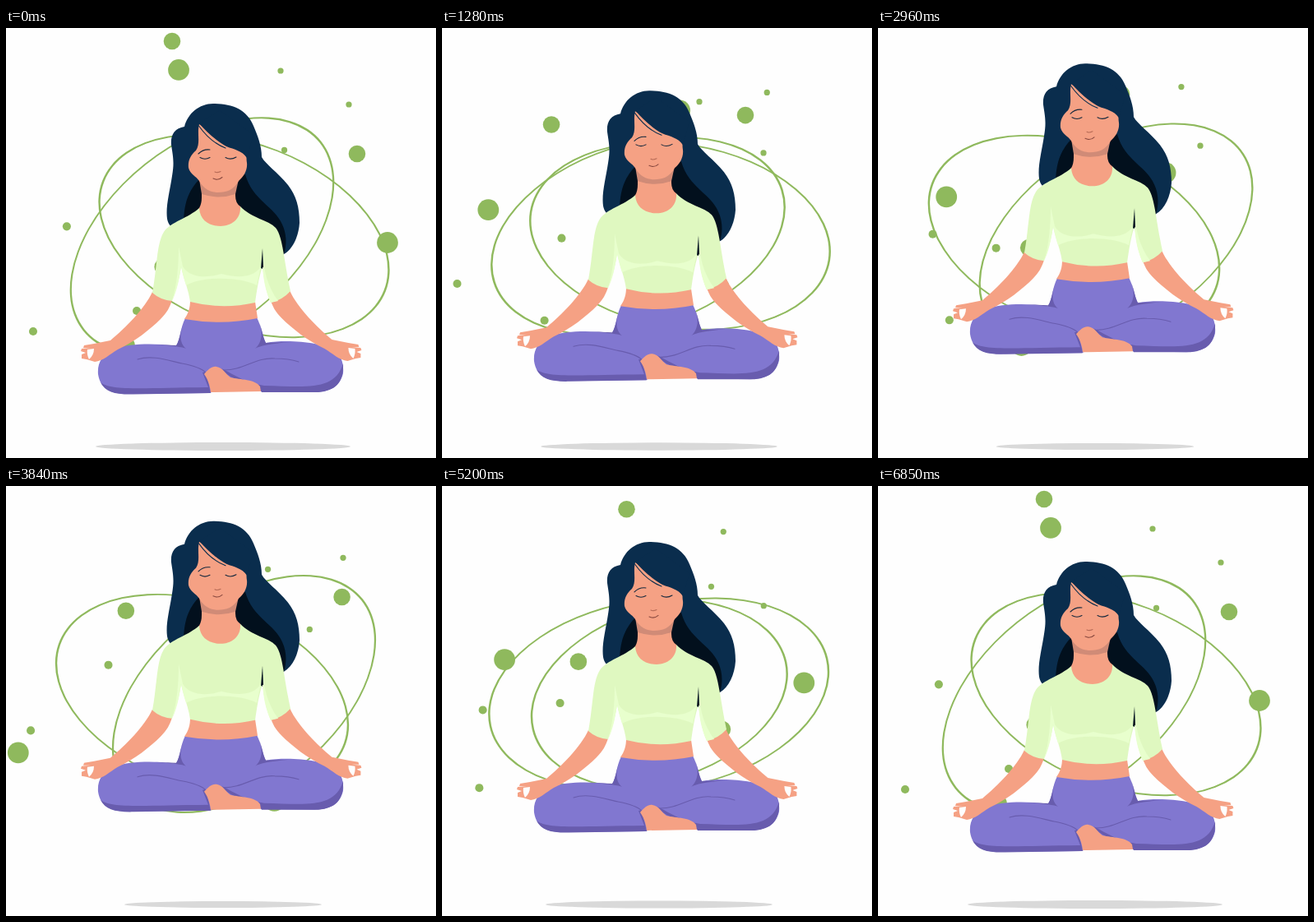
Recreate the animation shown at these times as an HTML page. Size 523 px wide and 523 px high, loop 6890 ms.

```html
<!DOCTYPE html>
<html lang="en">
<head>
<meta charset="utf-8">
<title>Meditation</title>
<style>
  html, body { margin: 0; width: 100%; height: 100%; overflow: hidden; background: #fefefe; }
  svg { display: block; width: 100vw; height: 100vh; }
  .green { fill: #8fb95d; }
  .hair { fill: #0a2d4d; }
  .dark { fill: #02101d; }
  .skin { fill: #f5a184; }
  .shirt { fill: #dff8c0; }
  .light { fill: #e8ffcd; }
  .pants { fill: #8177d0; }
  .shade { fill: #685cae; }
  .line { fill: none; stroke-width: 1.1; stroke-linecap: round; }
</style>
</head>
<body>
<svg viewBox="0 0 523 523">
  <defs>
    <path id="ring" class="green" fill-rule="evenodd"
      d="M-185 0a185 112.200 0 1 0 370 0a185 112.200 0 1 0-370 0M-182.500 0a182.500 110.400 0 1 0 365 0a182.500 110.400 0 1 0-365 0"/>
    <g id="arm">
      <path class="skin" d="M178 321C169 341 145 365 127 380L107 384L95 386L94 389L103 389L92 390L91 393L97 395L92 397L92 402L98 403L108 406C118 405 126 397 136 391C156 382 176 366 188 354C196 346 199 340 202 331Z"/>
      <path fill="#fefefe" d="M99 391L107 390Q107 398 101 403Q98 397 99 391Z"/>
    </g>
  </defs>

  <ellipse id="shadow" cx="264" cy="509" fill="#d9d9d9"/>
  <use id="ringA" href="#ring"/>
  <use id="ringB" href="#ring"/>
  <g id="dots" class="green"></g>

  <g id="woman">
    <path class="hair" d="M252 92C235 92 221 104 217 120C205 122 200 130 201 142C203 156 205 163 202 180C199 200 194 217 196 232C197 238 200 241 204 245L250 260L311 293C320 285 330 278 338 275C349 269 356 253 357 237C357 218 353 204 343 191C330 175 316 166 311 157C311 143 306 131 301 119C293 99 275 92 252 92Z"/>
    <path class="dark" d="M236 183C224 196 217 208 216 236L240 240L311 293L338 275C342 262 341 250 336 239C327 217 300 210 291 178Z"/>

    <path class="skin" d="M238 185V206Q238 214 235 219C226 250 295 250 285 217Q279 213 279 204V185Z"/>
    <path fill="#d08b77" d="M235 184L238 202Q259 209 279 202L283 184Z"/>
    <path class="skin" d="M235 117C232 128 237 140 231 149C225 154 221 161 222 170C224 178 231 180 235 186C241 197 250 200 258 200C268 200 277 197 283 186C289 181 294 173 293 164C292 158 293 154 292 150C272 140 250 128 235 117Z"/>
    <path class="hair" d="M235 116C244 127 257 138 268 144C278 148 287 149 293 158L301 130L260 100Z"/>
    <path class="line" stroke="#0a2d4d" d="M234.500 119C243 131 254 141 267 146"/>
    <path class="line" stroke="#14283d" d="M234 153Q240 147 248 148M236 157.500Q242 161 248 157.500M267 157.500Q273 161 280 157"/>
    <path class="line" stroke="#b96d58" d="M254 175Q257 176.500 261 174.500"/>
    <path class="line" stroke="#8a4a40" d="M252 183Q258 186 263 181.500"/>

    <path class="pants" d="M218 353Q262 361 305 352C311 364 312 375 316 383C345 378 385 383 400 392C408 399 411 408 410 420C406 436 395 442 375 443L311 442L270 434L248 444L155 445C130 446 115 441 112 421C111 407 117 396 133 390C150 384 180 383 207 387C212 378 212 365 218 353Z"/>
    <path class="shade" d="M115 431C127 441 160 438 246 437L239 419L243 418L249 444L155 445.500C133 446 121 443 115 431ZM262 414C280 423 292 432 314 435C365 436 400 442 410 408C411 430 402 441 380 443L311 443L305 434C290 428 274 430 262 414Z"/>
    <path class="shade" d="M215 362C210 376 213 385 219 390Q213 387 180 385L207 386C212 378 212 368 215 362ZM308 359C314 374 309 385 303 390Q310 385 345 382L316 383C312 376 312 367 308 359Z"/>
    <path class="line" stroke="#685cae" d="M160 403C178 397 199 405 214 408C230 411 239 415 243 419M264 416C288 417 304 400 327 402C340 402 350 404 356 406"/>
    <path class="skin" d="M241 421C246 415 251 411 256 412C264 413 267 421 273 425C285 428 303 427 309 436L310 442L249 443C248 433 244 425 241 421Z"/>

    <path class="skin" d="M224 331Q263 341 303 333L306 353Q262 362 217 354C222 347 224 340 224 331Z"/>
    <use href="#arm"/>
    <use href="#arm" transform="matrix(-1 0 0 1 523.400 -1)"/>
    <path class="shirt" d="M235 219C236 234 247 241 261 241C275 241 286 232 285 217C298 231 320 234 328 243C337 254 338 284 346 320Q336 331 322 334C316 320 314 306 312 290C307 305 305 320 303 334Q263 343 224 333C222 318 216 305 213 290C210 310 206 320 202 332Q188 331 178 322C184 290 183 262 192 248C200 236 222 231 235 219Z"/>
    <path class="light" d="M210 266C210 290 208 312 202 332C207 322 210 310 213 290C215 300 217 307 219 313C238 302 285 302 305 313L310 290C300 306 278 303 262 299C246 304 224 305 215 290ZM312 270C313 295 318 314 331 332L322 334C315 318 313 305 312 290Z"/>
    <path class="dark" d="M312 268L310 292.500L313 291Z"/>
  </g>
</svg>

<script>
const LOOP = 6890, LAST = 6850, STEP = 80;
const $ = id => document.getElementById(id);

// Closed track of the dots: [share of the loop, x, y]
const track = [
  [0, 0, 0], [.11, 34.2, 19.3], [.187, 61.3, 26.4], [.268, 83, 41], [.28, 85.4, 47.1],
  [.357, 75.3, 70.2], [.432, 58, 91.2], [.455, 57, 100], [.521, 49, 121.3], [.548, 38.8, 124.5],
  [.678, 5, 97], [.7, 1.2, 88.6], [.841, -17.1, 45.5], [.867, -21, 37.6], [.945, -16, 10.5], [.96, -11.5, 6]
];
const starts = [0, .268, .68];

// Each swarm runs on the same track: origin, complex factor, mirrored or not
const swarms = [
  { x: 334, y: 52, re: 1, im: 0, flip: 1 },
  { x: 33, y: 369, re: 1.34, im: .361, flip: -1 },
  { x: 202, y: 16, re: 2.834, im: .25, flip: 1 },
  { x: 464, y: 261, re: -1.455, im: -3.249, flip: -1 }
];

const dots = swarms.flatMap(swarm => starts.map(start => {
  const el = document.createElementNS("http://www.w3.org/2000/svg", "circle");
  el.setAttribute("r", 3.62 * Math.hypot(swarm.re, swarm.im));
  $("dots").append(el);
  return { swarm, start, el };
}));

function knot(i) {
  const n = track.length, turn = Math.floor(i / n), [u, x, y] = track[i - turn * n];
  return [u + turn, x, y];
}

// Smooth curve through the track points, timed by their shares
function onTrack(u) {
  u -= Math.floor(u);
  let i = track.length - 1;
  while (track[i][0] > u) i--;
  const [a, b, c, d] = [-1, 0, 1, 2].map(k => knot(i + k));
  const h = c[0] - b[0], s = (u - b[0]) / h;
  return [1, 2].map(k => {
    const m = (c[k] - a[k]) / (c[0] - a[0]) * h, n = (d[k] - b[k]) / (d[0] - b[0]) * h;
    return b[k] + s * (m + s * (3 * (c[k] - b[k]) - 2 * m - n + s * (2 * (b[k] - c[k]) + m + n)));
  });
}

const wave = (t, peak) => Math.cos((t - peak) / LAST * 2 * Math.PI);

function draw(t) {
  const lift = 51 * (1 - wave(t, 0)) / 2;
  $("woman").setAttribute("transform", `translate(0 ${-lift})`);
  $("shadow").setAttribute("rx", 155 - .711 * lift);
  $("shadow").setAttribute("ry", 5 - .02 * lift);

  $("ringA").setAttribute("transform", `translate(289.5 253) rotate(${-8.5 - 30.5 * wave(t, 3670)})`);
  $("ringB").setAttribute("transform", `translate(238.5 253) rotate(${-8.2 + 30.3 * wave(t, 3345)})`);

  for (const { swarm, start, el } of dots) {
    const [x, v] = onTrack(t / LAST + start), y = v * swarm.flip;
    el.setAttribute("cx", swarm.x + swarm.re * x - swarm.im * y);
    el.setAttribute("cy", swarm.y + swarm.re * y + swarm.im * x);
  }
}

function tick() {
  const t = performance.now() % LOOP;
  draw(t >= LAST ? LAST : Math.floor(t / STEP) * STEP);
  requestAnimationFrame(tick);
}
tick();
</script>
</body>
</html>
```
